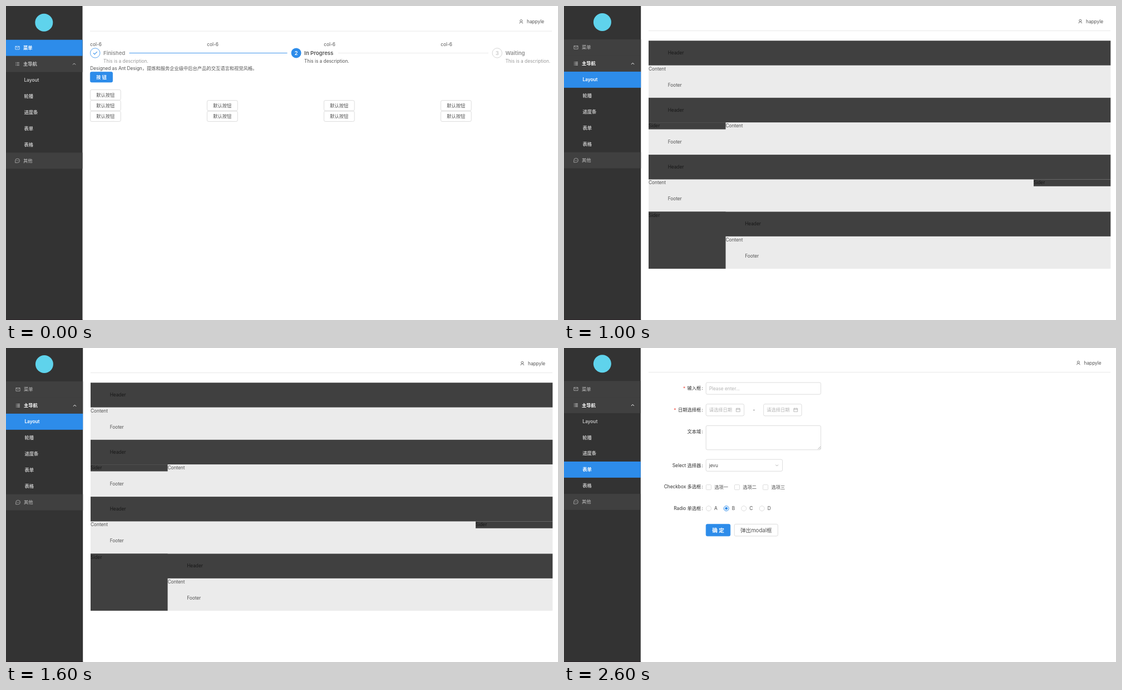
An HTML page for the animation above (3000 ms loop, 992 px wide and 564 px high).

```html
<!DOCTYPE html>
<html lang="zh-CN">
<head>
<meta charset="utf-8">
<title>Admin pages</title>
<style>
html, body { margin: 0; width: 100%; height: 100%; overflow: hidden; background: #fff; }
svg { display: block; width: 992px; height: 564px; }
text { font-family: Inter, "Noto Sans CJK SC", "Noto Sans CJK", sans-serif; white-space: pre; }
</style>
</head>
<body>
<svg id="stage" viewBox="0 0 992 564"></svg>
<script>
const NS = 'http://www.w3.org/2000/svg';
const stage = document.getElementById('stage');
const BLUE = '#2d8cea', BORDER = '#d4d4d4', INK = '#545454', GREY = '#999', DARK = '#404040', LIGHT = '#ebebeb';
let layer;

function add(tag, attrs, parent = layer) {
  const el = document.createElementNS(NS, tag);
  for (const k in attrs) el.setAttribute(k, attrs[k]);
  parent.appendChild(el);
  return el;
}
const rect = (x, y, w, h, fill) => add('rect', { x, y, width: w, height: h, fill });
const box = (x, y, w, h, r = 2.5, fill = '#fff', stroke = BORDER) =>
  add('rect', { x: x + .4, y: y + .4, width: w - .8, height: h - .8, rx: r, fill, stroke, 'stroke-width': .8 });
const circle = (cx, cy, r, fill, stroke = 'none', width = .8) =>
  add('circle', { cx, cy, r, fill, stroke, 'stroke-width': width });
const path = (d, stroke, width = .8) =>
  add('path', { d, fill: 'none', stroke, 'stroke-width': width });

// y is the vertical middle of the capitals
function text(str, x, y, { size = 8.27, fill = INK, weight = 400, anchor = 'start' } = {}) {
  add('text', { x, y: y + size * .36, 'font-size': size, fill, 'font-weight': weight, 'text-anchor': anchor })
    .textContent = str;
}

const icons = {
  mail(x, y, c) {
    path(`M${x - 3.6} ${y - 2.8}h7.2v5.6h-7.2zl3.6 3 3.6-3`, c, .7);
  },
  list(x, y, c) {
    for (const d of [-2.5, 0, 2.5]) path(`M${x - 3.5} ${y + d}h1m1 0h5`, c, .8);
  },
  chat(x, y, c) {
    path(`M${x - 3.8} ${y + 3.7}v-3.7a3.9 3.7 0 1 1 3.9 3.7z`, c, .7);
    for (const d of [-1.8, 0, 1.8]) circle(x + d, y, .5, c);
  },
  user(x, y) {
    circle(x, y - 1.4, 2, 'none', INK, .8);
    path(`M${x - 2.8} ${y + 3.6}q.2-3 2.8-3t2.8 3`, INK);
  },
  calendar(x, y) {
    path(`M${x - 3.4} ${y - 2.6}h6.8v5.8h-6.8zm0 2.1h6.8M${x - 1.7} ${y - 3.6}v1.8m3.4-1.8v1.8`, '#a0a0a0', .7);
  }
};

function menu(top, dx, width, active) {
  const step = 28.95, tops = i => top + i * step;
  rect(0, 0, width, 564, '#333');
  rect(0, 563, width, 1, '#2b2327');
  circle(68.3 + dx * .6, top - 31, 16, '#5fd3ec');
  for (const i of [0, 1, 7]) rect(0, tops(i), width, step, DARK);
  rect(0, tops(active), width, step, BLUE);
  ['菜单', '主导航', 'Layout', '轮播', '进度条', '表单', '表格', '其他'].forEach((label, i) => {
    const y = tops(i) + step / 2, sub = i > 1 && i < 7;
    const lit = i === active || (i === 1 && active > 1);
    const fill = lit ? '#fff' : '#c4c4c4';
    text(label, (sub ? 32.4 : 31) + dx, y, { fill, weight: sub || lit || i === 1 ? 600 : 500 });
    const icon = { 0: 'mail', 1: 'list', 7: 'chat' }[i];
    if (icon) icons[icon](20.5 + dx, y, fill);
    if (i === 1) path(`M${120 + dx} ${y + 1.4}l2.5-2.6 2.5 2.6`, fill, 1);
  });
}

function header(x, y, nameX, nameY, lineY) {
  icons.user(nameX - 10.2, nameY);
  text('happyle', nameX, nameY);
  rect(x, lineY, 830, .8, '#e3e3e3');
}

function button(label, x, y, w, h, primary, size) {
  if (primary) box(x, y, w, h, 2.5, BLUE, BLUE);
  else box(x, y, w, h);
  text(label, x + w / 2, y + h / 2, {
    size, anchor: 'middle', fill: primary ? '#fff' : INK, weight: primary ? 600 : 400
  });
}

function homePage() {
  menu(60.7, 0, 137.5, 0);
  header(151, 45, 936, 28, 44.7);
  const cols = [151.3, 361.3, 571.3, 781.3];
  cols.forEach(x => text('col-6', x, 69));

  rect(221.5, 84, 284, .9, BLUE);
  rect(597, 84, 270, .8, '#e5e5e5');
  circle(160.2, 84.4, 8.7, '#fff', BLUE);
  path('M157 84.5l2.3 2.3 4.4-4.7', BLUE, 1.1);
  circle(521.5, 84.4, 9, BLUE);
  circle(882.7, 84.4, 8.7, '#fff', '#c8c8c8');
  text('2', 521.5, 84.4, { size: 9.6, fill: '#fff', weight: 600, anchor: 'middle' });
  text('3', 882.7, 84.4, { size: 9.6, fill: '#bbb', anchor: 'middle' });
  [['Finished', 175, '#8f8f8f'], ['In Progress', 536, INK], ['Waiting', 897.5, '#8f8f8f']].forEach(([t, x, fill]) => {
    text(t, x, 84.3, { size: 9.6, fill, weight: 600 });
    text('This is a description.', x, 99.3, { fill: fill === INK ? INK : GREY });
  });

  text('Designed as Ant Design，提炼和服务企业级中后台产品的交互语言和视觉风格。', 151.3, 111.8);
  button('按 钮', 151, 118, 41, 19.3, true);
  button('默认按钮', 151, 150, 55.6, 19.3);
  for (const y of [169.2, 188.5]) cols.forEach(x => button('默认按钮', x - .3, y, 55.6, 19.3));
}

function layoutPage() {
  menu(60, 1, 138.2, 2);
  header(152, 44, 938, 27.6, 44);
  const L = 152, M = 290.5, R = 982.3;
  const label = (t, x, y) => text(t, x, y, { fill: 'rgba(0,0,0,.65)' });
  const block = (x1, x2, y, h, fill) => rect(x1, y, x2 - x1, h, fill);

  [62.3, 164.8, 267.1, 369.5].forEach((y, i) => {
    const left = i === 3 ? M : L;
    block(L, R, y, 102.4, LIGHT);
    block(L, R, y, 44.3, DARK);
    if (i === 1) block(L, M, y + 44.3, 12.4, DARK);
    if (i === 2) block(844, R, y + 44.3, 12.4, DARK);
    if (i === 3) block(L, M, y, 102.4, DARK);
    label('Header', left + 34.7, y + 22);
    label('Content', i === 1 ? M : left, y + 50.4);
    label('Footer', left + 34.7, y + 79.3);
    if (i) label('Sider', i === 2 ? 844 : L, i === 3 ? y + 6.3 : y + 50.4);
  });
}

function formPage() {
  menu(59.2, .9, 137.8, 5);
  header(152, 43, 934.6, 26.8, 43);
  const ink = { fill: '#484848' }, hint = { fill: '#b4b4b4' };

  [['输入框', 72.5, 216], ['日期选择框', 111.2, 199.4], ['文本域', 149.8], ['Select 选择器', 210.7],
   ['Checkbox 多选框', 249.5], ['Radio 单选框', 288]].forEach(([t, y, star]) => {
    text(t, 246.3, y, { fill: '#303030', anchor: 'end' });
    text(':', 249.8, y, { fill: '#303030', anchor: 'end' });
    if (star) text('*', star, y + 1, { fill: '#f04134', anchor: 'middle' });
  });

  box(254.8, 61.6, 207.2, 22);
  text('Please enter...', 260.7, 72.7, hint);
  for (const x of [254.8, 358.3]) {
    box(x, 100.3, 69.2, 22);
    text('请选择日期', x + 5.9, 111.3, hint);
    icons.calendar(x + 58, 111.2);
  }
  text('-', 341.3, 111, { ...ink, anchor: 'middle' });
  box(254.8, 139, 207.2, 44.2);
  path('M456.4 181.6l4.8-4.8m-2 4.8l2-2', '#777', .6);
  box(254.8, 199.7, 138.2, 22);
  text('jevu', 260.7, 210.7, ink);
  path('M380.3 209.6l2.3 2.4 2.3-2.4', '#a0a0a0');

  ['选项一', '选项二', '选项三'].forEach((t, i) => {
    const x = 255 + i * 51.1;
    box(x, 245.2, 9.8, 9.8, 1.2);
    text(t, x + 15.2, 250, ink);
  });
  [['A', 260], ['B', 291.7], ['C', 323.2], ['D', 355.7]].forEach(([t, x]) => {
    const on = t === 'B';
    circle(x, 288.2, 4.5, '#fff', on ? BLUE : BORDER, on ? 1 : .8);
    if (on) circle(x, 288.2, 2.4, BLUE);
    text(t, x + 10, 288.2, ink);
  });
  button('确 定', 254.8, 316, 44.4, 22.2, true, 9.65);
  button('弹出modal框', 305.8, 316, 79, 22.2, false, 9.65);
}

const pages = [homePage, layoutPage, formPage].map(draw => {
  layer = add('g', {}, stage);
  draw();
  return layer;
});

const HOLD = 1000;
let shown = -1;
function tick() {
  const page = Math.floor(performance.now() / HOLD) % pages.length;
  if (page !== shown) {
    pages.forEach((g, i) => { g.style.display = i === page ? '' : 'none'; });
    shown = page;
  }
  requestAnimationFrame(tick);
}
tick();
</script>
</body>
</html>
```
